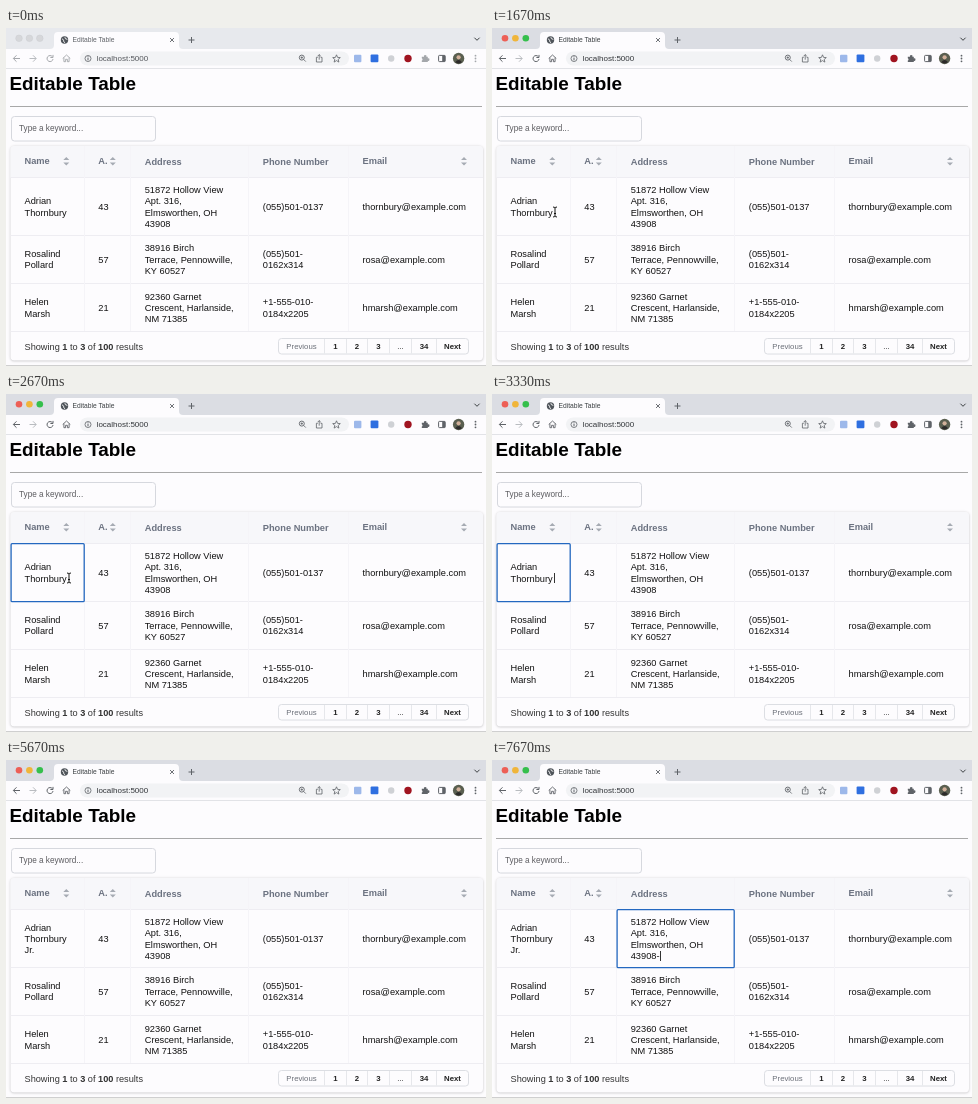
Animation, 480 px wide and 338 px high, one loop 8 s. Source, as an HTML page with a canvas:

```html
<!DOCTYPE html>
<html lang="en">
<head>
<meta charset="utf-8">
<title>Editable Table</title>
<style>
html, body { margin: 0; width: 100%; height: 100%; overflow: hidden; background: #fff; }
canvas { display: block; width: 480px; height: 338px; }
</style>
</head>
<body>
<canvas id="stage"></canvas>
<script>
const W = 480, H = 338, LOOP = 8000;
const SANS = '"Liberation Sans", Arial, sans-serif';
const PAPER = '#fdfcfe', LINE = '#eeedf2', BLUE = '#2468c0', ICON = '#5f6368';
const SIZE = 9.25, LEAD = 11.15;

const canvas = document.getElementById('stage');
const ctx = canvas.getContext('2d');
const dpr = window.devicePixelRatio || 1;
canvas.width = W * dpr;
canvas.height = H * dpr;

// Columns: left edge of the cell and of its text
const edges = [4.5, 78.5, 124.5, 242.5, 342.5, 476.5];
const textX = [18.5, 92.3, 138.7, 256.8, 356.5];
const rowY = [149.5, 207.5, 255.5, 303.5];
const rowMid = [178.8, 231.4, 279.8];

const rows = [
  [['Adrian', 'Thornbury'], ['43'],
   ['51872 Hollow View', 'Apt. 316,', 'Elmsworthen, OH', '43908'],
   ['(055)501-0137'], ['thornbury@example.com']],
  [['Rosalind', 'Pollard'], ['57'],
   ['38916 Birch', 'Terrace, Pennowville,', 'KY 60527'],
   ['(055)501-', '0162x314'], ['rosa@example.com']],
  [['Helen', 'Marsh'], ['21'],
   ['92360 Garnet', 'Crescent, Harlanside,', 'NM 71385'],
   ['+1-555-010-', '0184x2205'], ['hmarsh@example.com']]
];

// Each step replaces the one before it
const steps = [
  { at: 0, idle: true },
  { at: 1000, idle: true, mouse: ['arrow', 58, 193] },
  { at: 1330, mouse: ['beam', 62, 188], click: true },
  { at: 1670, mouse: ['beam', 63, 184] },
  { at: 2000, focus: 0, mouse: ['beam', 63, 184], click: true },
  { at: 2330, focus: 0, mouse: ['beam', 63, 184] },
  { at: 3000, focus: 0 },
  { at: 3330, focus: 0, caret: 2 },
  { at: 3670, focus: 0, suffix: 'J', caret: 0.6 },
  { at: 4000, focus: 0, suffix: 'Jr', caret: 0.6 },
  { at: 4330, focus: 0, suffix: 'Jr.', caret: 0.6 },
  { at: 5000, suffix: 'Jr.' },
  { at: 6000, suffix: 'Jr.', focus: 2, mouse: ['beam', 153, 179], click: true },
  { at: 6330, suffix: 'Jr.', focus: 2, mouse: ['beam', 153, 179], caret: 0.4 },
  { at: 7670, suffix: 'Jr.', focus: 2, dash: '-', caret: 0.6 }
];

function text(str, x, mid, size = SIZE, color = '#111', weight = 400, align = 'left') {
  ctx.font = `${weight} ${size}px ${SANS}`;
  ctx.textAlign = align;
  ctx.fillStyle = color;
  ctx.fillText(str, x, mid + size * 0.35);
  return ctx.measureText(str).width;
}

function rect(x, y, w, h, color) {
  ctx.fillStyle = color;
  ctx.fillRect(x, y, w, h);
}

function paint(fill, stroke, lw = 1) {
  if (fill) { ctx.fillStyle = fill; ctx.fill(); }
  if (stroke) { ctx.strokeStyle = stroke; ctx.lineWidth = lw; ctx.stroke(); }
}

function box(x, y, w, h, r, fill, stroke, lw) {
  ctx.beginPath();
  ctx.roundRect(x, y, w, h, r);
  paint(fill, stroke, lw);
}

function dot(x, y, r, fill, stroke, lw) {
  ctx.beginPath();
  ctx.arc(x, y, r, 0, 7);
  paint(fill, stroke, lw);
}

function path(x, y, d, stroke, lw = 1, fill) {
  ctx.save();
  ctx.translate(x, y);
  const p = new Path2D(d);
  if (fill) { ctx.fillStyle = fill; ctx.fill(p); }
  if (stroke) { ctx.strokeStyle = stroke; ctx.lineWidth = lw; ctx.stroke(p); }
  ctx.restore();
}

function tabs(idle) {
  rect(0, 0, W, 21, idle ? '#e7e9ed' : '#dbdde3');
  ['#ed5f56', '#f0b53a', '#35bf4c'].forEach((c, i) =>
    dot(13 + i * 10.4, 10.3, 3.3, idle ? '#d6d7da' : c, idle ? '#cbccd0' : null, 0.5));
  path(0, 0, 'M44 21Q48 21 48 17V8Q48 4 52 4H169Q173 4 173 8V17Q173 21 177 21Z', null, 0, PAPER);
  dot(58.5, 12, 3.7, '#50555b');
  path(58.5, 12, 'M-2.6-1.2Q-.6-.4-.8.8T.4 2.8M.4-2.8Q.2-1 2.8-.6', '#fff', 0.9);
  text('Editable Table', 66.5, 12, 6.7, idle ? '#606368' : '#3c4043');
  path(166, 12, 'M-2-2L2 2M2-2L-2 2', ICON, 0.9);
  path(185.5, 12, 'M-3 0H3M0-3V3', ICON, 1);
  path(471, 11, 'M-2.6-1.3L0 1.3L2.6-1.3', '#3c4043', 1);
}

function toolbar(idle) {
  const tone = idle ? '#a4a7ab' : ICON;
  rect(0, 21, W, 19, PAPER);
  path(10.5, 30.5, 'M3.5 0H-3M0-3.2L-3.2 0L0 3.2', tone, 1);
  path(27, 30.5, 'M-3.5 0H3M0-3.2L3.2 0L0 3.2', '#b9bcc0', 1);
  path(44, 30.5, 'M2.4-1.8A3 3 0 1 0 3 .6M3-3.6V-1H.4', tone, 1);
  path(60.5, 30.5, 'M-3.8 0L0-3.5L3.8 0M-2.6-.8V3.2H-.9V.8H.9V3.2H2.6V-.8', tone, 0.9);
  box(74, 23.5, 269, 14, 7, '#f2f3f5');
  dot(82, 30.5, 3, null, ICON, 0.8);
  rect(81.5, 30, 1, 2.2, ICON);
  rect(81.5, 28.4, 1, 1, ICON);
  text('localhost:5000', 90.6, 30.3, 8, idle ? '#55585d' : '#33363a');

  dot(295.8, 29.6, 2.5, null, ICON, 0.9);
  path(295.8, 29.6, 'M1.8 1.8L4 4M-1.2 0H1.2M0-1.2V1.2', ICON, 0.8);
  path(313.2, 30.5, 'M-1.4-1.2H-2.8V3.5H2.8V-1.2H1.4M0 1.2V-3.8M-1.6-2.3L0-3.9L1.6-2.3', ICON, 0.8);
  path(330.5, 30.6, 'M0-3.8L1.1-1.2L3.8-1L1.7.8L2.4 3.5L0 2L-2.4 3.5L-1.7.8L-3.8-1L-1.1-1.2Z', ICON, 0.8);

  box(348, 26.8, 7.4, 7.4, 1, '#9db8ea');
  box(364.6, 26.5, 7.8, 7.8, 1, '#2f6fe0');
  dot(385.2, 30.5, 3.2, '#cfd1d5');
  dot(402, 30.5, 3.7, '#a01420');
  path(419.2, 30.5, 'M-3.4-1.8H-1.2A1.3 1.3 0 1 1 1.2-1.8H2.6V0A1.2 1.2 0 1 1 2.6 2.2V3.6H-3.4V2A1.2 1.2 0 0 0-3.4-.2Z', null, 0, tone);
  box(432.6, 27.4, 6.6, 6.2, 0.8, null, ICON, 1);
  rect(436.2, 27.4, 3, 6.2, ICON);
  dot(452.6, 30.5, 5.7, '#5a5f50');
  dot(452.6, 29.3, 2.1, '#d2b09a');
  path(452.6, 30.5, 'M-3.4 3.8Q0-.8 3.4 3.8Q0 6 -3.4 3.8Z', null, 0, '#2c2a2a');
  for (let i = -1; i < 2; i++) dot(469.5, 30.5 + i * 2.8, 0.9, tone);
  rect(0, 40, W, 1, '#e2e3e7');
}

function sorter(x) {
  path(x, 133.3, 'M-3-1.2L0-4.2L3-1.2ZM-3 1.2L0 4.2L3 1.2Z', null, 0, '#a6abb3');
}

function pager() {
  const cuts = [272.5, 318.5, 340.5, 361.5, 383.5, 405.5, 430.5, 462.5];
  const labels = ['Previous', '1', '2', '3', '...', '34', 'Next'];
  box(cuts[0], 310.5, 190, 15.5, 3, PAPER, '#dcdee3');
  labels.forEach((label, i) => {
    if (i) rect(cuts[i] - 0.5, 311, 1, 14.5, '#e6e7eb');
    const plain = i === 0 || i === 4;
    text(label, (cuts[i] + cuts[i + 1]) / 2, 318, 7.8,
      i === 0 ? '#6b6f78' : '#222', plain ? 400 : 700, 'center');
  });
}

function page() {
  text('Editable Table', 3.4, 55.8, 18.9, '#000', 700);
  rect(4, 78, 472, 1, '#a8a8a8');
  box(5.5, 88.5, 144, 24.5, 3, PAPER, '#d6d8de');
  text('Type a keyword...', 13, 100.3, 8.2, '#5c5c60');

  ctx.save();
  ctx.shadowColor = 'rgba(0,0,0,.25)';
  ctx.shadowBlur = 2.5 * dpr;
  ctx.shadowOffsetY = 0.6 * dpr;
  box(4.5, 118, 472.5, 214.5, 4, PAPER);
  ctx.restore();
  box(4.5, 118, 472.5, 31.5, [4, 4, 0, 0], '#f7f7fa');
  rowY.forEach(y => rect(4.5, y - 0.5, 472.5, 1, LINE));
  edges.slice(1, -1).forEach(x => rect(x - 0.5, 118, 1, 185, '#f5f4f8'));

  ['Name', 'A.', 'Address', 'Phone Number', 'Email'].forEach((label, i) =>
    text(label, textX[i], i === 2 || i === 3 ? 134 : 132.8, SIZE, '#6b7280', 700));
  [60.3, 106.8, 458].forEach(sorter);

  let x = 18.5;
  'Showing |1| to |3| of |100| results'.split('|').forEach((part, i) => {
    x += text(part, x, 319, 9.2, '#333', i % 2 ? 700 : 400);
  });
  pager();
  rect(0, 337, W, 1, '#cfcfcf');
}

// Draws a cell and returns where its last line ends
function cell(lines, col, row) {
  let end;
  lines.forEach((line, i) => {
    const y = rowMid[row] + (i - (lines.length - 1) / 2) * LEAD;
    end = [textX[col] + text(line, textX[col], y), y];
  });
  return end;
}

function mouse([kind, x, y]) {
  if (kind === 'arrow') {
    path(x, y, 'M0 0V8L1.9 6.3L3.2 9.1L4.6 8.5L3.4 5.7H5.9Z', '#fff', 0.8, '#000');
  } else {
    const beam = 'M-2-5Q0-5 0-3.8Q0-5 2-5M0-3.8V3.8M-2 5Q0 5 0 3.8Q0 5 2 5M-1 1.5H1';
    path(x, y, beam, '#fff', 2);
    path(x, y, beam, '#111', 1);
  }
}

function draw(t) {
  const s = steps.filter(step => step.at <= t).pop();
  ctx.setTransform(dpr, 0, 0, dpr, 0, 0);
  rect(0, 0, W, H, PAPER);
  tabs(s.idle);
  toolbar(s.idle);
  page();

  const ends = rows.map((row, r) => row.map((lines, c) => {
    const shown = lines.slice();
    if (r === 0 && c === 0 && s.suffix) shown.push(s.suffix);
    if (r === 0 && c === 2 && s.dash) shown[3] += s.dash;
    return cell(shown, c, r);
  }));

  if (s.focus !== undefined) {
    const x = edges[s.focus] + 0.6;
    box(x, 149.7, edges[s.focus + 1] - x - 0.3, 58, 1, null, BLUE, 1.3);
  }
  if (s.caret) {
    const [x, y] = ends[0][s.focus];
    rect(Math.floor(x + s.caret), Math.round(y - 5), 1, 10, '#333');
  }
  if (s.mouse) {
    if (s.click) dot(s.mouse[1], s.mouse[2], 7.8, null, '#111', 1.6);
    mouse(s.mouse);
  }
}

const start = performance.now();
function tick() {
  draw((performance.now() - start) % LOOP);
  requestAnimationFrame(tick);
}
tick();
</script>
</body>
</html>
```
